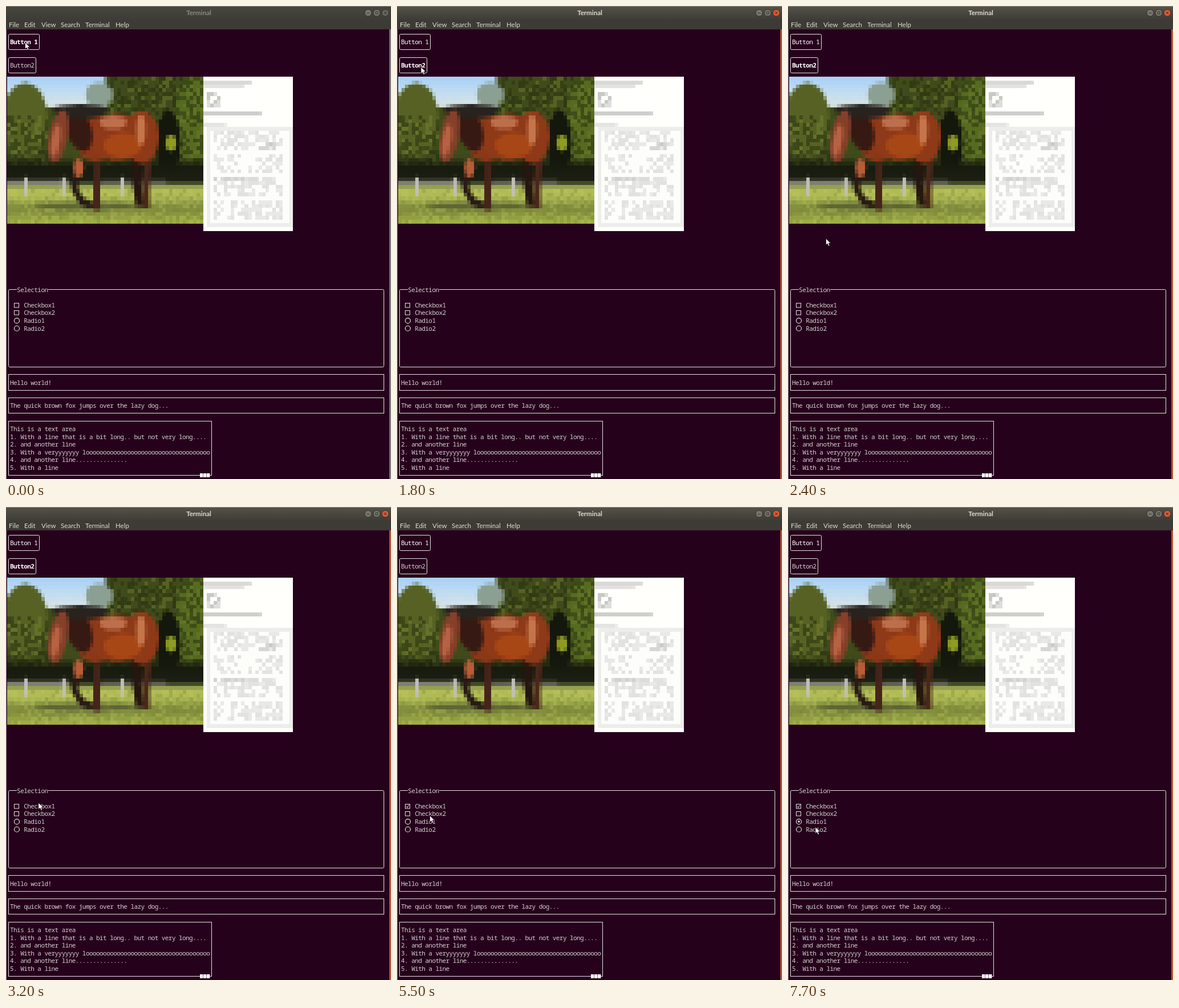
An HTML page with a canvas that plays this animation: 675x830 px, repeating every 8 s.

```html
<!DOCTYPE html>
<html lang="en">
<head>
<meta charset="utf-8">
<title>Terminal</title>
<style>
  html, body { margin: 0; width: 675px; height: 830px; overflow: hidden; background: #26011c; }
  canvas, svg { position: absolute; left: 0; top: 0; }
  canvas { image-rendering: pixelated; top: 124px; }
  #photo { left: 2px; width: 344px; height: 258px; }
  #page { left: 346px; width: 157px; height: 271px; }

  text { white-space: pre; }
  .mono { font: 11px "Noto Sans Mono", "DejaVu Sans Mono", monospace; letter-spacing: -.56px; fill: #d3d0cf; }
  .menu { font: 11.5px Lato, "Open Sans", sans-serif; fill: #dfdbd2; }
  .title { font-weight: bold; text-anchor: middle; }
  .line { fill: none; stroke: #e6e2e4; }

  #title, #edge, #close, #bar, #button1, #button2, #tick1, #tick2, #dot, #cursor { animation: 8s step-end infinite; }
  #title { animation-name: title; }
  #edge { animation-name: edge; }
  #close { animation-name: close; }
  #bar { animation-name: bar; }
  #button1 { animation-name: button1; }
  #button2 { animation-name: button2; }
  #tick1 { animation-name: tick1; }
  #tick2 { animation-name: tick2; }
  #dot { animation-name: dot; }
  #cursor { animation-name: move; }

  @keyframes title { 0% { fill: #8b8980; } 7.5%, 100% { fill: #dfdbd2; } }
  @keyframes edge { 0% { fill: #7d767a; } 7.5%, 100% { fill: #c04f32; } }
  @keyframes close { 0% { fill: #66645c; } 7.5%, 100% { fill: #e0572f; } }
  @keyframes bar { 0% { opacity: 0; } 7.5%, 100% { opacity: 1; } }
  @keyframes button1 { 0% { font-weight: 700; fill: #fff; } 22.5%, 100% { font-weight: 400; } }
  @keyframes button2 { 0%, 48.75%, 100% { font-weight: 400; } 22.5% { font-weight: 700; fill: #fff; } 48.75%, 100% { fill: #d3d0cf; } 0% { fill: #d3d0cf; } }
  @keyframes tick1 { 0% { opacity: 0; } 48.75%, 100% { opacity: 1; } }
  @keyframes tick2 { 0%, 68.75%, 100% { opacity: 0; } 60% { opacity: 1; } }
  @keyframes dot { 0% { opacity: 0; } 87.5%, 100% { opacity: 1; } }

  /* The pointer moves in 100 ms steps between a few stops. */
  @keyframes move {
    0% { translate: 33.5px 64px; }
    12.5%, 13.75% { translate: 40px 81px; animation-timing-function: steps(2); }
    16.25% { translate: 42px 107px; }
    26.25% { translate: 43.5px 118.5px; animation-timing-function: steps(3); }
    30% { translate: 66.5px 408px; animation-timing-function: steps(2); }
    32.5%, 33.75% { translate: 62px 470px; animation-timing-function: steps(3); }
    37.5% { translate: 48px 516px; }
    40%, 48.75% { translate: 57px 519px; animation-timing-function: steps(4); }
    53.75% { translate: 55.5px 535px; }
    68.75% { translate: 57.5px 541.5px; }
    75% { translate: 57px 532px; animation-timing-function: steps(2); }
    77.5% { translate: 56.5px 541px; }
    78.75% { translate: 53px 556px; }
    82.5% { translate: 56px 551px; }
    90%, 93.75% { translate: 52px 552px; animation-timing-function: steps(2); }
    96.25%, 100% { translate: 48px 561.5px; }
  }
</style>
</head>
<body>
<canvas id="photo" width="57" height="38"></canvas>
<canvas id="page" width="26" height="40"></canvas>
<svg width="675" height="830" viewBox="0 0 675 830">
  <defs>
    <linearGradient id="dim" x2="0" y2="1"><stop stop-color="#48473f"/><stop offset="1" stop-color="#3c3b35"/></linearGradient>
    <linearGradient id="lit" x2="0" y2="1"><stop stop-color="#55534a"/><stop offset="1" stop-color="#3c3b35"/></linearGradient>
  </defs>

  <path d="M.5 41V830" stroke="#8c868a"/>
  <rect width="675" height="41" fill="#3c3b35"/>
  <rect width="675" height="25" fill="url(#dim)"/>
  <rect id="bar" width="675" height="25" fill="url(#lit)"/>
  <path d="M0 .5H675" stroke="#8a8880"/>
  <rect id="edge" x="672" y="41" width="3" height="789"/>
  <text id="title" class="menu title" x="338" y="16">Terminal</text>
  <g stroke="#34332e" fill="#77756c">
    <circle cx="635" cy="12" r="6"/>
    <circle cx="650" cy="12" r="6"/>
    <circle id="close" cx="665" cy="12" r="6"/>
    <path d="M632.5 12.5h5M648 10h4v4h-4zM663 10l4 4m0-4l-4 4" fill="none"/>
  </g>
  <g class="menu">
    <text x="5" y="37">File</text>
    <text x="32" y="37">Edit</text>
    <text x="62" y="37">View</text>
    <text x="96" y="37">Search</text>
    <text x="139" y="37">Terminal</text>
    <text x="192" y="37">Help</text>
  </g>

  <g id="boxes" class="line"></g>
  <g id="words" class="mono"></g>
  <g class="line">
    <path id="tick1" d="M16 525l2 2.5 3-5"/>
    <path id="tick2" d="M16 538.5l2 2.5 3-5"/>
    <circle id="dot" cx="19" cy="552" r="1.7" fill="#fff" stroke="none"/>
  </g>
  <path d="M340 820h5.3v7h-5.3zm6 0h5.3v7h-5.3zm6 0h5.3v7h-5.3z" fill="#fff"/>
  <path id="cursor" d="M0 0V11.5L2.7 9 4.6 13.4 6.6 12.5 4.8 8.3H8.4Z" fill="#fff" stroke="#111" stroke-width=".8"/>
</svg>
<script>
  const CELL_W = 6.04, CELL_H = 13.58;
  const colX = col => 4.5 + col * CELL_W;
  const rowY = row => 49.4 + row * CELL_H;
  const snap = v => Math.floor(v) + .5;

  function add(parent, tag, attrs, text = '') {
    const el = document.createElementNS('http://www.w3.org/2000/svg', tag);
    for (const k in attrs) el.setAttribute(k, attrs[k]);
    el.textContent = text;
    document.getElementById(parent).append(el);
    return el;
  }

  function box(row, lastRow, lastCol, rx = 0) {
    const x = snap(colX(0)), y = snap(rowY(row));
    return add('boxes', 'rect', { x, y, rx, width: snap(colX(lastCol)) - x, height: snap(rowY(lastRow)) - y });
  }

  function say(row, col, str) {
    return add('words', 'text', { x: colX(col) - 3.5, y: rowY(row) + 4.1 }, str);
  }

  function drawWidgets() {
    box(0, 2, 9, 2);
    box(3, 5, 8, 2);
    box(33, 43, 109, 2);
    box(44, 46, 109);
    box(47, 49, 109);
    box(50, 57, 59);
    say(1, 1, 'Button 1').id = 'button1';
    say(4, 1, 'Button2').id = 'button2';

    add('boxes', 'path', { d: 'M19 497.5h55', style: 'stroke:#26011c;stroke-width:3' });
    say(33, 3, 'Selection');
    ['Checkbox1', 'Checkbox2', 'Radio1', 'Radio2'].forEach((name, i) => {
      const y = rowY(35 + i);
      say(35 + i, 5, name);
      if (i < 2) add('boxes', 'rect', { x: 14.5, y: snap(y - 3.5), width: 8, height: 7.5 });
      else add('boxes', 'circle', { cx: 19, cy: y + .3, r: 4.5, 'stroke-width': 1.2 });
    });

    say(45, 1, 'Hello world!');
    say(48, 1, 'The quick brown fox jumps over the lazy dog...');
    [
      'This is a text area',
      '1. With a line that is a bit long.. but not very long....',
      '2. and another line',
      '3. With a veryyyyyyy l' + 'o'.repeat(36),
      '4. and another line' + '.'.repeat(15),
      '5. With a line'
    ].forEach((str, i) => say(51 + i, 1, str));
  }

  let seed = 7;
  const rand = () => (seed = (seed * 16807) % 2147483647) / 2147483647;

  // Paints in stage coordinates on a canvas with one pixel per cell.
  function painter(id, left, cw, ch) {
    const top = 124;
    const c = document.getElementById(id).getContext('2d');
    c.setTransform(1 / cw, 0, 0, 1 / ch, -left / cw, -top / ch);
    c.lineJoin = 'round';
    const p = {
      box(color, x, y, w, h) {
        c.fillStyle = color;
        c.fillRect(x, y, w, h);
      },
      blob(color, x, y, rx, ry, turn = 0) {
        c.fillStyle = color;
        c.beginPath();
        c.ellipse(x, y, rx, ry, turn, 0, 7);
        c.fill();
      },
      limb(color, width, path) {
        c.strokeStyle = color;
        c.lineWidth = width;
        c.stroke(new Path2D(path));
      },
      fade(y0, y1, ...colors) {
        const g = c.createLinearGradient(0, y0, 0, y1);
        colors.forEach((k, i) => g.addColorStop(i / (colors.length - 1), k));
        return g;
      },
      speckle(colors, x, y, w, h, chance) {
        const x0 = left + Math.round((x - left) / cw) * cw;
        const y0 = top + Math.round((y - top) / ch) * ch;
        for (let v = y0; v < y + h - 1; v += ch)
          for (let u = x0; u < x + w - 1; u += cw)
            if (rand() < chance) p.box(colors[Math.floor(rand() * colors.length)], u, v, cw, ch);
      }
    };
    return p;
  }

  function drawHorse() {
    const p = painter('photo', 2, 344 / 57, 258 / 38);
    p.box('#404b1b', 2, 124, 344, 190);
    p.box(p.fade(124, 178, '#a8d0f6', '#c0dcf0', '#dbe5e4'), 2, 124, 172, 54);
    p.blob('#8b9f92', 164, 156, 24, 22);
    p.blob('#566123', 34, 200, 40, 66);
    p.blob('#566a20', 330, 200, 34, 80);
    p.speckle(['#2a341080', '#75823380', '#1d250b70'], 2, 190, 72, 100, .6);
    p.speckle(['#2a341080', '#6d7a2a80', '#1d250b70'], 180, 124, 166, 170, .6);
    p.blob('#14170c', 284, 240, 22, 56);
    p.blob('#8f9c22', 289, 240, 10, 15);
    p.box(p.fade(262, 306, '#14170c00', '#171a0e', '#1c1f12'), 2, 262, 344, 50);

    p.box(p.fade(312, 382, '#7f8b4b', '#b8c157', '#a3b04f', '#7f8a3c', '#8b993e', '#a4b24a'), 2, 312, 344, 70);
    p.box('#8b8980', 2, 306, 108, 7);
    p.box('#66655a', 166, 306, 115, 7);
    p.speckle(['#c8cb6640', '#6f7c3640'], 2, 318, 344, 64, .5);
    p.blob('#4f5430b0', 140, 350, 95, 6);
    for (const x of [32, 98, 201]) p.box('#c2c0b8', x, 300, 6, 34);

    p.limb('#281b14', 12, 'M122 290L120 322L132 342L152 352');
    p.limb('#46241a', 12, 'M160 262L159 310V358');
    p.limb('#25170f', 16, 'M228 256L230 310L236 352');
    p.limb('#4a2819', 12, 'M252 250L246 310V354');
    p.blob('#b75d38', 127, 284, 9, 17);
    p.blob('#8b3818', 156, 232, 34, 42);
    p.blob('#8e3918', 195, 230, 56, 42);
    p.blob('#8e3918', 238, 230, 30, 47);
    p.blob('#361913', 128, 218, 22, 38, -.3);
    p.blob('#a84716', 205, 244, 34, 22);
    p.blob('#bd6f4c', 188, 204, 24, 12);
    p.blob('#c4754a', 237, 218, 8, 28);
    p.blob('#28231e', 130, 184, 48, 13);
    p.blob('#85402a', 92, 228, 16, 47, .18);
    p.blob('#b76242', 87, 236, 7, 28, .15);
  }

  function drawPage() {
    const p = painter('page', 346, 157 / 26, 271 / 40);
    p.box('#fffffb', 346, 124, 157, 271);
    p.box('#d8d8d6', 346, 131, 84, 6.8);
    p.box('#e2e2e0', 346, 137.6, 72, 6.8);
    p.speckle(['#c8c8c6', '#dededc'], 352, 151, 24, 27, .7);
    p.box('#cececc', 346, 185, 102, 6.8);
    p.box('#e4e4e2', 346, 205.3, 40, 6.8);
    p.box('#ededeb', 352, 212, 151, 176);
    p.box('#fdfdfa', 358, 219, 139, 162);
    for (let line = 0; line < 23; line++)
      if (line % 6 < 5) p.speckle(['#e2e2e0', '#e9e9e7'], 364, 219 + line * 6.8, 121, 6, .55);
    p.speckle(['#cacac8', '#d6d6d4'], 442, 239, 30, 14, .7);
    p.speckle(['#d2d2d0', '#dcdcda'], 364, 300, 79, 6, .8);
  }

  drawWidgets();
  drawHorse();
  drawPage();
</script>
</body>
</html>
```
